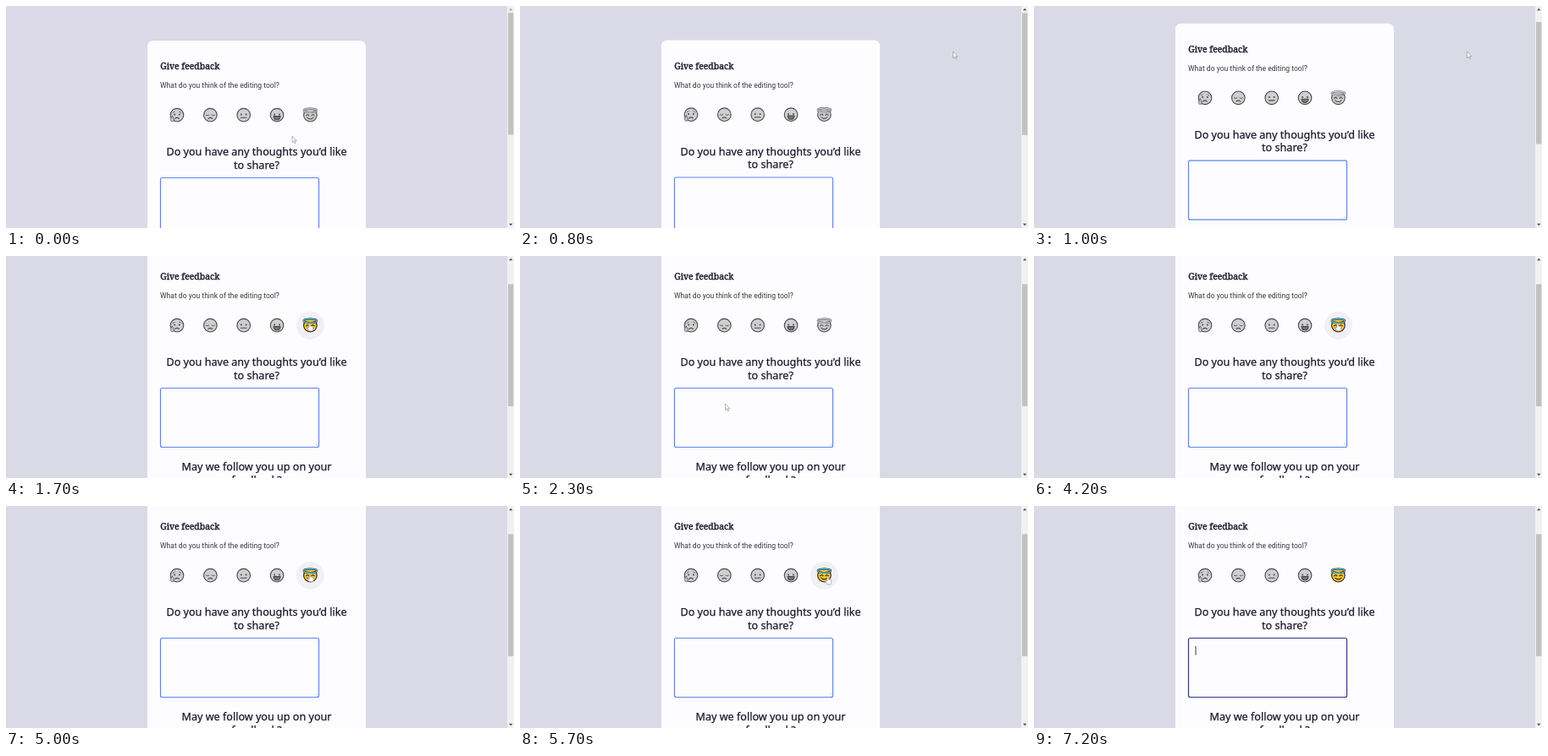
Animation of 600 by 263 pixels, one loop 8000 ms. Source, as an HTML page:

```html
<!DOCTYPE html>
<html lang="en">
<head>
<meta charset="utf-8">
<title>Feedback form</title>
<style>
  html, body { margin: 0; width: 100%; height: 100%; overflow: hidden; }
  svg { display: block; width: 100vw; height: 100vh; }
  text { font-family: "Noto Sans", sans-serif; fill: #1b1a2c; }
  .title { font: 10.45px "Noto Serif", serif; stroke: #1b1a2c; stroke-width: .4; }
  .label { font: 8.55px Roboto, sans-serif; fill: #39383f; }
  .question { font-size: 12.6px; text-anchor: middle; stroke: #1b1a2c; stroke-width: .25; }
  .face { --skin: #cfced0; --accent: #cfced0; --ink: #4a494d; fill: none; stroke: var(--ink); stroke-width: 1.1; stroke-linecap: round; stroke-linejoin: round; }
  .face.on { --skin: #fcc83a; --accent: #55c4de; --ink: #1f1d1c; }
  .skin { fill: var(--skin); }
  .accent { fill: var(--accent); stroke-width: .8; }
  .eye { fill: var(--ink); stroke: none; }
  .disc { fill: #f1f0f3; stroke: none; visibility: hidden; }
  .hover .disc { visibility: visible; }
  #arrow, #hand { fill: #fff; stroke: #85848c; stroke-width: .6; stroke-linejoin: round; }
</style>
</head>
<body>
<svg viewBox="0 0 600 263" preserveAspectRatio="none">
  <rect id="back" width="600" height="263"/>
  <g id="page">
    <rect x="167" y="41" width="258" height="420" rx="6.5" fill="#fdfcfe"/>
    <text class="title" x="182.2" y="75">Give feedback</text>
    <text class="label" x="182" y="97.4">What do you think of the editing tool?</text>
    <g id="faces"></g>
    <text class="question" x="296" y="177">Do you have any thoughts you’d like</text>
    <text class="question" x="296" y="192.6">to share?</text>
    <rect id="box" x="182.5" y="203.5" width="187" height="70" rx="2" fill="#fdfcfe" stroke-width="1.2"/>
    <path d="M365.5 271.5l2.5-2.5M367.2 271.5l.8-.8" stroke="#aaa" stroke-width=".5"/>
    <path id="caret" d="M191 213v10.5" stroke="#222" stroke-width=".9"/>
    <text class="question" x="296" y="301">May we follow you up on your</text>
    <text class="question" x="296" y="316.6">feedback?</text>
  </g>
  <rect x="592" width="8" height="263" fill="#f1f1f1"/>
  <rect id="thumb" x="593" width="6.4" height="144.5" fill="#c1c1c1"/>
  <path id="up" d="M594 5.2l2.2-2.4 2.2 2.4z"/>
  <path d="M594 257.8l2.2 2.4 2.2-2.4z" fill="#505050"/>
  <g id="cursor">
    <path id="arrow" d="M0 0V7.6L1.8 6 3 8.7 4.2 8.2 3 5.6H5.4z"/>
    <path id="hand" d="M-.8 .6Q0-.5 .8 .6V3Q2 2.5 2.4 3.4 4.3 3 4.3 4.6V6.4Q4.2 7.6 3.4 8.8H-.9Q-1.4 7.2-2.9 5.4-2.6 4.1-.8 5.2z"/>
  </g>
</svg>
<script>
const $ = id => document.getElementById(id);
const LOOP = 8000, FACE_Y = 129.2, SCROLL = 47;
const faceX = i => 202 + 39.35 * i;

const dots = '<g class="eye"><circle cx="-2.9" cy="-.8" r="1"/><circle cx="2.9" cy="-.8" r="1"/></g>';
const frown = '<path d="M-2.4 4.2Q0 2 2.4 4.2"/>';
const features = [
  dots + frown + '<path d="M-5-2.8L-2.8-4M5-2.8L2.8-4" stroke-width=".7"/>' +
    '<path class="accent" d="M-5.6 1.2C-7.8 3.8-8.4 7.4-5.6 7.6-3 7.4-3.6 3.8-5.6 1.2z"/>',
  '<path d="M-5 0Q-3.3 1.6-1.6 0M1.6 0Q3.3 1.6 5 0" stroke-width=".9"/>' + frown,
  dots + '<path d="M-3.4 3H3.4"/>',
  dots + '<path d="M-4 1.4H4Q3.5 5.6 0 5.6T-4 1.4z" fill="#77767a"/>',
  '<path d="M-4.8 .6Q-3.1-1.6-1.4 .6M1.4 .6Q3.1-1.6 4.8 .6M-3.6 3Q0 6.4 3.6 3"/>' +
    '<ellipse class="skin" cy="-5.4" rx="7.7" ry="2.2" stroke-width="2.2"/>' +
    '<ellipse cy="-5.4" rx="7.7" ry="2.2" style="stroke:var(--accent)" stroke-width="1.3"/>'
];
$('faces').innerHTML = features.map((shapes, i) =>
  `<g class="face" transform="translate(${faceX(i)} ${FACE_Y})"><circle class="disc" r="16.5"/><circle class="skin" r="7.8"/>${shapes}</g>`).join('');
const faces = [...$('faces').children];

const progress = (t, from, to) => Math.min(1, Math.max(0, (t - from) / (to - from)));
const smooth = u => u * u * (3 - 2 * u);
const smoother = u => u * u * u * (10 - 15 * u + 6 * u * u);

// Cursor rests: arrival, departure, x, y. It glides from one to the next.
const rests = [
  [0, 100, 338, 154], [500, 600, 204, 104], [800, 1000, 511.5, 54],
  [1600, 1700, 358.5, 80], [2100, 2100, 225, 242], [2500, 2500, 260, 108],
  [2900, 3000, 210, 85], [3100, 3600, 209, 107], [3700, 3700, 426, 125],
  [4200, 4600, 358.5, 80], [4800, 4800, 320, 83], [5000, 5200, 359, 81],
  [5500, 5900, 363.5, 84], [6000, LOOP, 362, 104]
];

function cursorAt(t) {
  const i = rests.findLastIndex(r => r[0] <= t);
  const [, leave, x, y] = rests[i], next = rests[i + 1];
  if (!next || t <= leave) return [x, y];
  const u = smooth(progress(t, leave, next[0]));
  return [x + (next[2] - x) * u, y + (next[3] - y) * u];
}

function draw(t) {
  const scroll = SCROLL * smoother(progress(t, 740, 1300));
  $('page').setAttribute('transform', `translate(0 ${-scroll})`);
  $('thumb').setAttribute('y', 8 + scroll * .54);
  $('up').setAttribute('fill', scroll > 0 ? '#505050' : '#a3a3a3');
  $('back').setAttribute('fill', t < 700 ? '#dcd9e9' : '#dadae7');

  const [x, y] = cursorAt(t);
  const visible = t < 3300 || t >= 3700 && t < 6100;
  let hovering = false;
  faces.forEach((face, i) => {
    const hover = visible && Math.hypot(x - faceX(i), y - FACE_Y + scroll) < 15;
    const picked = i === 4 && t >= 5900;
    face.classList.toggle('hover', hover);
    face.classList.toggle('on', hover || picked);
    hovering ||= hover;
  });
  $('cursor').setAttribute('transform', `translate(${x} ${y})`);
  $('cursor').style.display = visible ? '' : 'none';
  $('arrow').style.display = hovering ? 'none' : '';
  $('hand').style.display = hovering ? '' : 'none';

  const focus = progress(t, 6500, 6800);
  const mix = (a, b) => a + (b - a) * focus;
  $('box').setAttribute('stroke', `rgb(${mix(92, 42)},${mix(134, 56)},${mix(238, 135)})`);
  $('caret').style.display = focus > 0 ? '' : 'none';
}

function tick() {
  // The picture advances ten times a second.
  draw(Math.floor(performance.now() % LOOP / 100) * 100);
  requestAnimationFrame(tick);
}
tick();
</script>
</body>
</html>
```
